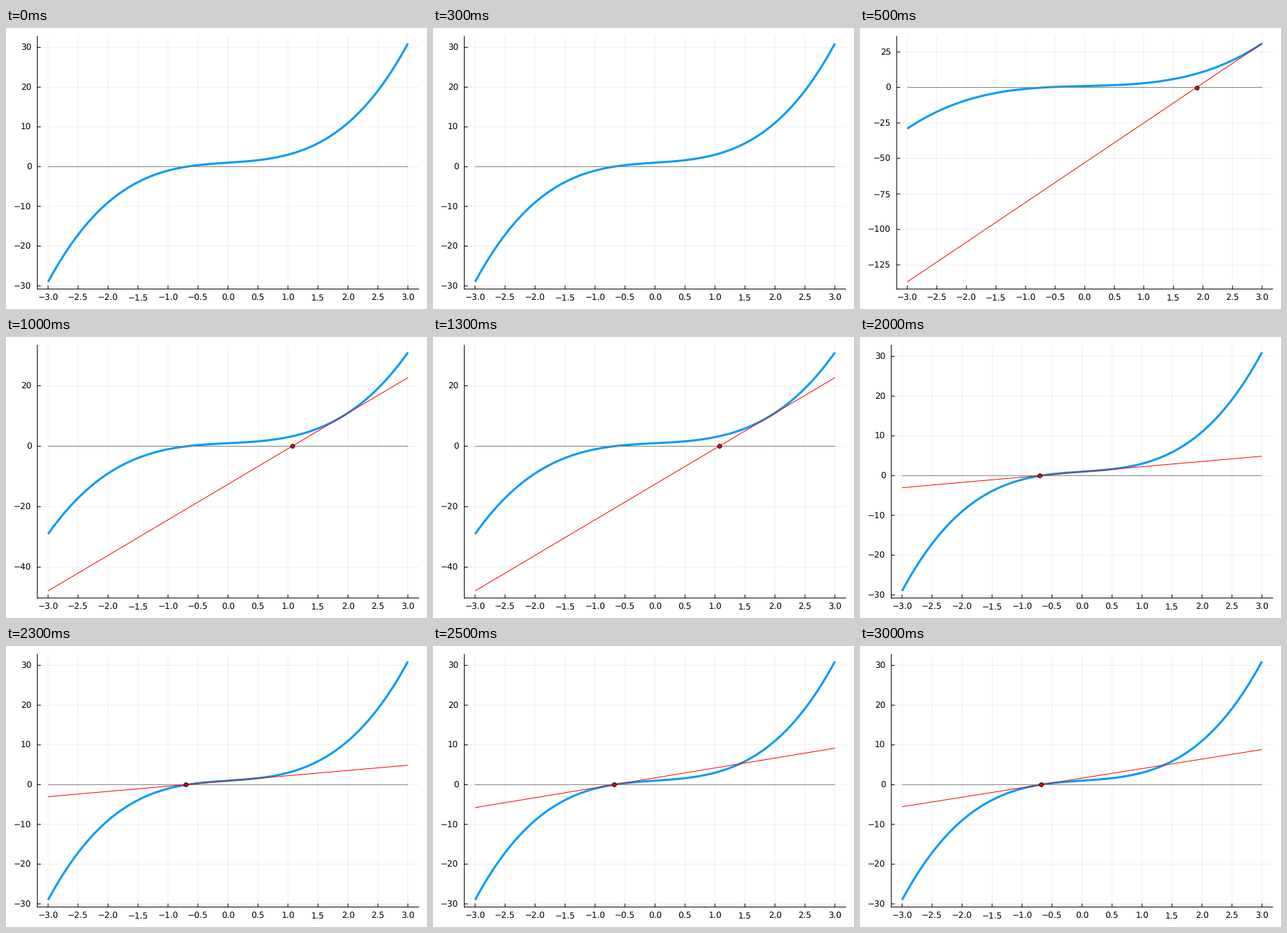
A matplotlib script for the animation above (3.5 s loop, 600 px wide and 400 px high).

```python
import numpy as np
import matplotlib.pyplot as plt
from matplotlib.animation import FuncAnimation

W, H, DPI = 600, 400, 100
PT = 72 / DPI                      # points per pixel
RIGHT, TOP, BOTTOM = 588.2, 11.8, 371.6
EM = 12                            # label size in pixels
DIGIT = 0.636 * EM                 # digit advance
PAD = 0.03
STEPS = 7

plt.rcParams["font.family"] = "DejaVu Sans"
plt.rcParams["text.hinting"] = "none"
plt.rcParams["text.hinting_factor"] = 1

fig = plt.figure(figsize=(W / DPI, H / DPI), dpi=DPI, facecolor="white")
ax = fig.add_axes([0, 0, 1, 1])


def f(x):
    return x**3 + x + 1


def slope(x):
    return 3 * x**2 + 1


def newton(n):
    """Point reached from x = 3 after n steps."""
    x = 3.0
    for _ in range(n):
        x -= f(x) / slope(x)
    return x


def padded(lo, hi):
    extra = PAD * (hi - lo)
    return lo - extra, hi + extra


def line(x, y, color, width=1, **kw):
    ax.plot(x, y, color=color, lw=width * PT, snap=False, **kw)


def label(x, y, text, ha):
    text = text.replace("-", "\u2212")
    ax.text(x, y, text, ha=ha, va="baseline", fontsize=EM * PT, color="black")


def draw(i):
    ax.clear()
    ax.set(xlim=(0, W), ylim=(H, 0))
    ax.axis("off")

    xs = np.linspace(-3, 3, 241)
    ends = np.array([-3.0, 3.0])
    values = f(ends)
    if i:
        base = newton(i - 1)
        tangent = f(base) + slope(base) * (ends - base)
        values = np.append(values, tangent)

    x0, x1 = padded(-3, 3)
    y0, y1 = padded(values.min(), values.max())
    step = next(s for s in (10, 20, 25) if (y1 - y0) / s < 7.5)
    yticks = np.arange(np.ceil(y0 / step), np.floor(y1 / step) + 1) * step
    xticks = np.arange(-3, 3.1, 0.5)

    # the left margin grows with the widest label
    digits = max(len(f"{abs(t):.0f}") for t in yticks)
    left = 44.6 + (digits - 2) * DIGIT

    def px(x):
        return left + (x - x0) / (x1 - x0) * (RIGHT - left)

    def py(y):
        return BOTTOM - (y - y0) / (y1 - y0) * (BOTTOM - TOP)

    for t in xticks:
        line([px(t)] * 2, [TOP, BOTTOM], "black", 0.6, alpha=0.1)
    for t in yticks:
        line([left, RIGHT], [py(t)] * 2, "black", 0.6, alpha=0.1)

    line([left, RIGHT], [BOTTOM] * 2, "black")
    line([left] * 2, [TOP, BOTTOM], "black")
    for t in xticks:
        line([px(t)] * 2, [BOTTOM, BOTTOM - 5], "black", solid_capstyle="butt")
        label(px(t), 387.8, f"{t:.1f}", "center")
    for t in yticks:
        line([left, left + 5], [py(t)] * 2, "black", solid_capstyle="butt")
        label(left - 8.2, py(t) + 4.4, f"{t:.0f}", "right")

    line(px(xs), py(f(xs)), "#009AFA", 3, solid_capstyle="butt")
    line(px(ends), py(0 * ends), "#808080", solid_capstyle="butt")
    if i:
        line(px(ends), py(tangent), "red", solid_capstyle="butt")
        line([px(newton(i))], [py(0)], "red", marker="o", ms=5.6 * PT,
             mec="black", mew=1 * PT)


anim = FuncAnimation(fig, draw, frames=STEPS, interval=500,
                     init_func=lambda: draw(0), repeat=True, repeat_delay=0)
plt.show()
```
